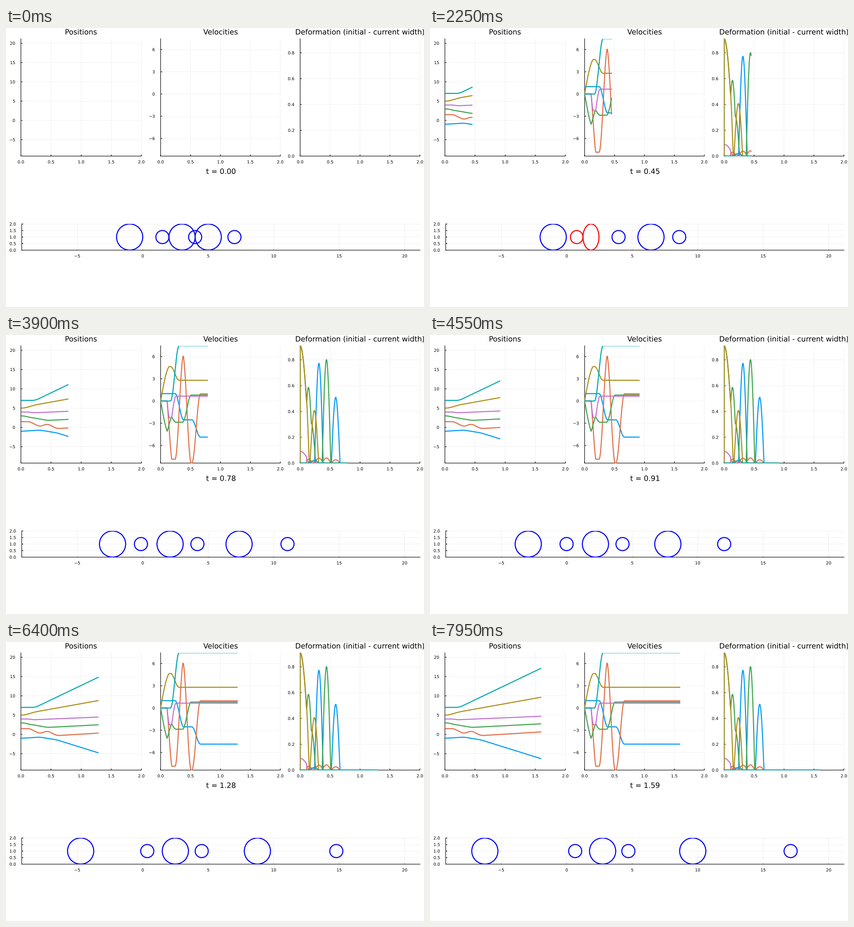
Recreate the animation shown at these times as a matplotlib script. Size 917 by 611 pixels, loop 8 s.

```python
import numpy as np
import matplotlib.pyplot as plt
from matplotlib.animation import FuncAnimation
from matplotlib.patches import Ellipse, PathPatch
from matplotlib.path import Path
from matplotlib.textpath import TextPath

W, H = 917, 611
PT = 0.72  # points per pixel at 100 dpi
THIN, MID, THICK = 0.57 * PT, 1.14 * PT, 2.29 * PT
FRAMES, INTERVAL = 160, 50
PER_FRAME = 10  # samples per frame, 0.001 s apart

plt.rcParams["font.family"] = "DejaVu Sans"

RADII = [1.0, 0.5] * 3
MASS = np.array(RADII) ** 2
STIFF = [100.0, 2000.0] * 3
START = [-1.0, 1.5, 3.0, 4.0, 5.0, 7.0]
COLORS = ["#009afa", "#e36f47", "#3ea44e", "#c371d2", "#ac8e18", "#00aaae"]
N = len(RADII)


def solve_contacts(x, lam, sweeps=60):
    """Contact forces that squeeze the touching balls with least energy.

    lam is padded with a zero at each end and updated in place.
    """
    for _ in range(sweeps):
        for i in range(N - 1):
            a, b = 1 / STIFF[i], 1 / STIFF[i + 1]
            overlap = RADII[i] + RADII[i + 1] - (x[i + 1] - x[i])
            rest = overlap - a * lam[i] - b * lam[i + 2]
            lam[i + 1] = max(0.0, rest / (a + b))


def simulate(samples, dt=0.0005, substeps=2):
    x = np.array(START)
    v = np.zeros(N)
    v[0] = 1.0
    lam = [0.0] * (N + 1)

    def accel():
        solve_contacts(x.tolist(), lam)
        f = np.array(lam)
        return (f[:-1] - f[1:]) / MASS

    pos, vel, deform = [x.copy()], [v.copy()], [np.zeros(N)]
    acc = accel()
    for _ in range(samples):
        for _ in range(substeps):
            v += 0.5 * dt * acc
            x += dt * v
            acc = accel()
            v += 0.5 * dt * acc
        f = np.array(lam)
        pos.append(x.copy())
        vel.append(v.copy())
        deform.append(2 * (f[:-1] + f[1:]) / STIFF)
    return np.array(pos), np.array(vel), np.array(deform)


pos, vel, deform = simulate((FRAMES - 1) * PER_FRAME)
time = np.arange(len(pos)) * 0.01 / PER_FRAME

fig = plt.figure(figsize=(W / 100, H / 100), dpi=100, facecolor="white")


def text_path(x, y, text, size, ha="center"):
    """Outline of text with its baseline at pixel y, in figure fractions."""
    glyphs = TextPath((0, 0), text.replace("-", "\u2212")
                      if text[1:].isdigit() else text, size=size)
    box = glyphs.get_extents()
    anchor = box.x1 if ha == "right" else (box.x0 + box.x1) / 2
    xy = (glyphs.vertices + [x - anchor, H - y]) / [W, H]
    return Path(xy, glyphs.codes)


def label(x, y, text, size=9.14, ha="center"):
    return fig.add_artist(PathPatch(text_path(x, y, text, size, ha),
                                    transform=fig.transFigure, fc="black",
                                    lw=0, snap=False))


def panel(box, xlim, ylim, xticks, yticks, xfmt, yfmt, xtick_len=3.5):
    left, top, right, bottom = box
    width, height = right - left, bottom - top
    ax = fig.add_axes([left / W, 1 - bottom / H, width / W, height / H])
    ax.set(xlim=xlim, ylim=ylim, xticks=[], yticks=[])
    ax.patch.set_visible(False)
    ax.spines[["top", "right"]].set_visible(False)
    for side in ("left", "bottom"):
        ax.spines[side].set(linewidth=MID, zorder=1, snap=False)

    def rule(xs, ys, **style):
        ax.plot(xs, ys, transform=ax.transAxes, color="black", snap=False,
                clip_on=False, solid_capstyle="butt", **style)

    grid = dict(lw=THIN, alpha=0.1, zorder=0.5)
    tick = dict(lw=MID, zorder=1)
    for t in xticks:
        u = (t - xlim[0]) / (xlim[1] - xlim[0])
        rule([u, u], [0, 1], **grid)
        rule([u, u], [0, xtick_len / height], **tick)
        label(left + u * width, bottom + 16, xfmt.format(t))
    for t in yticks:
        u = (t - ylim[0]) / (ylim[1] - ylim[0])
        rule([0, 1], [u, u], **grid)
        rule([0, 3.5 / width], [u, u], **tick)
        label(left - 13.1, bottom - u * height + 3.4, yfmt.format(t),
              ha="right")
    return ax


def chart(left, right, title, ylim, yticks, yfmt):
    ax = panel((left, 23.5, right, 280.5), (0, 2), ylim,
               [0, 0.5, 1, 1.5, 2], yticks, "{:.1f}", yfmt)
    label((left + right) / 2, 14.2, title, 16)
    return [ax.plot([], [], color=c, lw=THICK, zorder=3, snap=False,
                    solid_capstyle="projecting", solid_joinstyle="round")[0]
            for c in COLORS]


SPAN = (-9.24, 21.17)
charts = [
    (chart(32.7, 297, "Positions", SPAN, range(-5, 21, 5), "{:d}"), pos),
    (chart(339.2, 601.7, "Velocities", (vel.min(), vel.max()),
           range(-6, 7, 3), "{:d}"), vel),
    (chart(645.3, 908, "Deformation (initial - current width)",
           (0, deform.max()), [0, 0.2, 0.4, 0.6, 0.8], "{:.1f}"), deform),
]

stage = panel((34.5, 429.2, 908.3, 486.5), SPAN, (0, 2), range(-5, 21, 5),
              [0, 0.5, 1, 1.5, 2], "{:d}", "{:.1f}", xtick_len=1)
clock = label(471.4, 319.5, "t = 0.00", 16)
balls = [stage.add_patch(Ellipse((x, 1), 2 * r, 2 * r, fill=False,
                                 lw=THICK, zorder=3, snap=False))
         for x, r in zip(START, RADII)]


def update(n):
    k = n * PER_FRAME
    for lines, data in charts:
        for i, line in enumerate(lines):
            if n:
                line.set_data(time[:k + 1], data[:k + 1, i])
            else:
                line.set_data([], [])
    for i, ball in enumerate(balls):
        squeeze = deform[k, i]
        ball.set_center((pos[k, i], 1))
        ball.set_width(2 * RADII[i] - squeeze)
        ball.set_edgecolor("red" if squeeze > 1e-9 else "blue")
    clock.set_path(text_path(471.4, 319.5, f"t = {n / 100:.2f}", 16))


anim = FuncAnimation(fig, update, frames=FRAMES, interval=INTERVAL,
                     init_func=lambda: update(0), repeat=True, repeat_delay=0)
plt.show()
```
